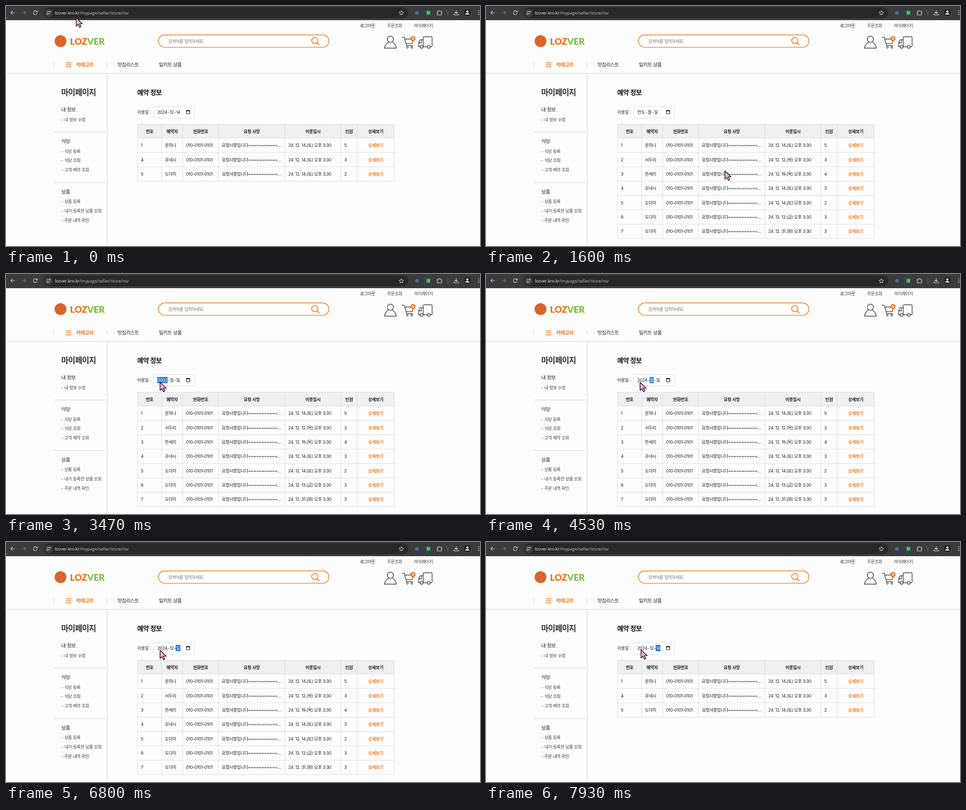
An HTML page for the animation above (8 s loop, 1000x508 px).

```html
<!DOCTYPE html>
<html lang="ko">
<head>
<meta charset="utf-8">
<title>예약 정보</title>
<style>
html, body { margin: 0; width: 100%; height: 100%; overflow: hidden; background: #fefdfe; }
#stage { position: absolute; left: 0; top: 0; width: 1000px; height: 508px; overflow: hidden; }
svg { position: absolute; left: 0; top: 0; }
text, #date { font-family: Inter, "Noto Sans CJK KR", "Noto Sans CJK", sans-serif; letter-spacing: -.045em; word-spacing: .02em; white-space: pre; }
#date { position: absolute; left: 318.6px; top: 218px; display: flex; font-size: 9.1px; line-height: 13px; color: #222; }
#date span { height: 13px; }
#date .field { padding: 0 .65px; }
#date .hint { letter-spacing: 0; }
#date .on { background: #2878d0; color: #fff; }
.link { stroke: #ee7416; stroke-width: .25px; }
</style>
</head>
<body>
<div id="stage">
  <svg id="page" width="1000" height="508" viewBox="0 0 1000 508" fill="none"></svg>
  <div id="date"></div>
  <svg width="1000" height="508" viewBox="0 0 1000 508">
    <path id="cursor" d="M0 0V17.5L4.2 13.8 7.2 20.2 10.2 18.8 7.3 12.7H13Z" fill="#f9a8e0" stroke="#111" stroke-width="1.3" stroke-linejoin="round"/>
  </svg>
</div>
<script>
const LOOP = 8000, ORANGE = '#ee7416', INK = '#222', GREY = '#444', RULE = '#dcdbe0';
const page = document.getElementById('page');
const dateBox = document.getElementById('date');
const cursor = document.getElementById('cursor');

const text = (x, y, s, o = {}) =>
  `<text x="${x}" y="${y}" font-size="${o.size || 9.1}" fill="${o.fill || INK}" font-weight="${o.weight || 400}"` +
  ` text-anchor="${o.anchor || 'start'}" class="${o.cls || ''}" style="${o.style || ''}">${s}</text>`;
const rect = (x, y, w, h, fill, more = '') =>
  `<rect x="${x}" y="${y}" width="${w}" height="${h}" fill="${fill}" ${more}/>`;
const circle = (x, y, r, fill, more = '') => `<circle cx="${x}" cy="${y}" r="${r}" fill="${fill}" ${more}/>`;
const path = (d, stroke, width = 1, more = '') =>
  `<path d="${d}" stroke="${stroke}" stroke-width="${width}" ${more}/>`;
const round = 'stroke-linecap="round" stroke-linejoin="round"';

function browserBar() {
  const light = '#d4d4d6';
  const url = "font-family:'Open Sans',sans-serif;letter-spacing:0";
  const star = Array.from({ length: 10 }, (_, i) => {
    const a = -Math.PI / 2 + i * Math.PI / 5, r = i % 2 ? 2.3 : 5;
    return (834 + r * Math.cos(a)).toFixed(1) + ' ' + (14.8 + r * Math.sin(a)).toFixed(1);
  }).join('L');
  return rect(0, 0, 1000, 30, '#3b3b3c') +
    rect(79, 3, 770, 23, '#282829', 'rx="11.5"') +
    path('M18.5 14H10.5M14 10.2 10.2 14 14 17.8', light, 1.2) +
    path('M34 14H42M38.3 10.2 42.1 14 38.3 17.8', '#77777a', 1.2) +
    '<g id="hover">' + circle(62, 14.5, 11.2, '#505052') + '</g>' +
    path('M65 11.6A4 4 0 1 0 65.8 15.2M66 9.8V12.6H63.2', light, 1.2) +
    circle(90, 14.3, 9, '#3d3d3f') +
    path('M86 12H90M93 16.7H89', light, 1.1) +
    circle(92.3, 12, 1.5, 'none', `stroke="${light}"`) + circle(87.5, 16.7, 1.5, 'none', `stroke="${light}"`) +
    text(103.3, 17.8, 'lozver.kro.kr<tspan fill="#c2c2c5">/mypage/seller/store/rsv</tspan>', { size: 9, fill: '#f1f1f2', style: url }) +
    path('M' + star + 'Z', light, 1, 'stroke-linejoin="round"') +
    circle(867, 14.3, 4, '#46659f') +
    rect(887, 10.3, 8, 8, '#41b883') +
    path('M910 11H912.7A1.6 1.6 0 0 1 915.8 11H918.5V13.8A1.6 1.6 0 0 1 918.5 16.6V19H910V16.4A1.6 1.6 0 0 0 910 13.6Z', light, 1.2, 'stroke-linejoin="round"') +
    path('M932 9.5V19.5', '#68686b') +
    path('M949.8 9V16M946.7 13 949.8 16.1 952.9 13M945.2 16V19H954.4V16', light, 1.2) +
    circle(973.3, 14, 7, '#1d1d1f') + circle(973.3, 11.8, 2.3, '#f4f4f5') +
    '<path d="M968.9 18Q969.2 14.9 973.3 14.9Q977.4 14.9 977.7 18Z" fill="#f4f4f5"/>' +
    [10.3, 14.2, 18.1].map(y => circle(997.3, y, 1, light)).join('');
}

function siteHeader() {
  const logo = 'font-family:Lato,sans-serif;letter-spacing:0';
  return text(747, 45, '로그아웃') +
    text(804, 45, '주문조회', { fill: GREY }) + text(861, 45, '마이페이지', { fill: GREY }) +
    circle(115, 74.3, 12.5, '#d9652b') +
    text(135, 81.6, 'LOZ<tspan fill="#7cbf45">VER</tspan>', { size: 19, weight: 900, fill: ORANGE, style: logo }) +
    rect(321.7, 61.2, 359.6, 26.2, '#fff', `rx="13.1" stroke="${ORANGE}" stroke-width="1.4"`) +
    text(342, 77.5, '검색어를 입력하세요.', { fill: '#757575' }) +
    circle(651.4, 73, 6.5, 'none', `stroke="${ORANGE}" stroke-width="1.5"`) +
    path('M656 77.8 660.6 82.2', ORANGE, 1.7, round) +
    // account, cart, delivery
    circle(811, 70.3, 6.5, 'none', `stroke="${GREY}" stroke-width="1.4"`) +
    path('M798.8 89.2C799 82.5 803 79.2 807 76M815 76C819 79.2 823 82.5 823.2 89.2H798.8', GREY, 1.4, round) +
    path('M835.8 66.2H840.2L845.3 84H858.2M841.2 70H860.2L857.3 79.6H844', GREY, 1.4, round) +
    circle(846.7, 87.6, 1.8, 'none', `stroke="${GREY}" stroke-width="1.2"`) +
    circle(856, 87.6, 1.8, 'none', `stroke="${GREY}" stroke-width="1.2"`) +
    circle(858.6, 69, 5.4, ORANGE) +
    text(858.5, 71.9, '0', { size: 8, weight: 700, fill: '#fff', anchor: 'middle' }) +
    path('M874 86.2H870.7V78L873.4 71.5H880M880.2 86.2V67.2Q880.2 65.2 882.2 65.2H897Q899 65.2 899 67.2V84.2Q899 86.2 897 86.2H895.2M880.2 86.2H888.6M871 78H876.5V73.5', GREY, 1.4, round) +
    circle(877, 86.4, 3, 'none', `stroke="${GREY}" stroke-width="1.4"`) +
    circle(892, 86.4, 3, 'none', `stroke="${GREY}" stroke-width="1.4"`) +
    path('M100.5 119V129.5M213.5 119V129.5', '#d2d1d5') +
    path('M126 120.4H138M126 124.6H138M126 128.8H138', ORANGE, 1.5) +
    text(148, 128.2, '카테고리', { size: 10.4, weight: 600, fill: ORANGE }) +
    text(235, 128.2, '맛집리스트', { size: 10.4 }) + text(322.5, 128.2, '밀키트 상품', { size: 10.4 }) +
    path('M0 142.5H1000M213.5 142.5V508M100 267H213.5M100 373.5H213.5', '#d4d3d7');
}

function sideMenu() {
  const groups = [
    [223, '내 정보', ['내 정보 수정']],
    [290, '식당', ['식당 등록', '식당 조회', '고객 예약 조회']],
    [396.8, '상품', ['상품 등록', '내가 등록한 상품 조회', '주문 내역 확인']]
  ];
  return text(116.5, 189.4, '마이페이지', { size: 16.7, weight: 600, fill: '#333' }) +
    groups.map(([y, title, items]) => text(116.5, y, title, { size: 10.6, weight: 500 }) +
      items.map((s, i) => text(116.8, y + 20.5 + i * 19.8, '- ' + s, { fill: GREY })).join('')).join('');
}

const edges = [277.5, 328.2, 372.8, 448.2, 588.5, 706.5, 741, 819];
const heads = ['번호', '예약자', '전화번호', '요청 사항', '이용일시', '인원', '상세보기'];
const bookings = [
  [1, '문하나', '14.(토)', 5], [2, '서두리', '12.(목)', 3], [3, '한세리', '19.(목)', 4],
  [4, '유네시', '14.(토)', 3], [5, '도다미', '14.(토)', 2], [6, '도다미', '13.(금)', 3], [7, '도다미', '31.(화)', 3]
];
const TOP = 250.3, HEAD = 29.3, ROW = 30.38;
const middle = i => (edges[i] + edges[i + 1]) / 2;

function table(id, rows) {
  const first = TOP + HEAD, end = first + rows.length * ROW;
  const body = rows.map(([no, name, day, count], r) => {
    const y = first + r * ROW + 18.6;
    const cells = [no, name, '010-0101-0101', '요청사항입니다' + '~'.repeat(11) + '…', `24. 12. ${day} 오후 3:30`, count];
    return path(`M277.5 ${first + r * ROW}H819`, RULE) +
      cells.map((s, i) => text(edges[i] + 7, y, s)).join('') +
      text(middle(6), y, '상세보기', { weight: 500, fill: ORANGE, anchor: 'middle', cls: 'link' });
  }).join('');
  return `<g id="${id}">` + rect(277.5, TOP, 541.5, HEAD, '#f0eff2') +
    heads.map((s, i) => text(middle(i), 268.5, s, { weight: 600, anchor: 'middle' })).join('') + body +
    path(edges.map(x => `M${x} ${TOP}V${end}`).join('') + `M277.5 ${TOP}H819M277.5 ${end}H819`, RULE) + '</g>';
}

page.innerHTML = browserBar() + siteHeader() + sideMenu() +
  text(277, 187.6, '예약 정보', { size: 13.8, weight: 600, fill: '#111' }) +
  text(277, 227.8, '이용일 :') +
  rect(311.5, 212.3, 86, 24.8, '#fff', `rx="2.5" stroke="${RULE}"`) +
  rect(380.7, 221.2, 7, 7, 'none', 'stroke="#111" stroke-width="1.1" rx=".6"') +
  path('M380.2 221.7H388.2', '#111', 1.8) + path('M382.2 219.8V221.5M386.2 219.8V221.5', '#111', 1.1) +
  table('all', bookings) + table('some', bookings.filter(b => b[2].startsWith('14')));

const [all, some, hover] = ['all', 'some', 'hover'].map(id => document.getElementById(id));
const RELOAD = 950, FILTER = 6900;

// time, year, month, day, selected field
const entries = [
  [0, '2024', '12', '14', -1],
  [RELOAD, '연도', '월', '일', -1],
  [2750, '연도', '월', '일', 0],
  [3400, '0002', '월', '일', 0],
  [3630, '0020', '월', '일', 0],
  [3860, '0202', '월', '일', 0],
  [4090, '2024', '월', '일', 0],
  [4450, '2024', '월', '일', 1],
  [4850, '2024', '01', '일', 1],
  [5100, '2024', '12', '일', 2],
  [6850, '2024', '12', '01', 2],
  [FILTER, '2024', '12', '14', 2]
];
// time, x, y of the pointer tip
const moves = [
  [0, 148, 25], [70, 146, 25], [480, 62, 13], [1020, 62, 13], [1500, 504, 349], [1750, 504, 349],
  [2500, 325, 229], [7840, 325, 229], [7920, 327, 228], [LOOP, 327, 228]
];

function pointer(t) {
  const i = Math.max(1, moves.findIndex(m => m[0] > t));
  const [t0, x0, y0] = moves[i - 1], [t1, x1, y1] = moves[i];
  const p = (t - t0) / (t1 - t0), e = p * p * (3 - 2 * p);
  return [x0 + (x1 - x0) * e, y0 + (y1 - y0) * e];
}

let shown = null;
function showDate(entry) {
  if (entry === shown) return;
  shown = entry;
  const on = entry[4];
  dateBox.innerHTML = entry.slice(1, 4).map((s, i) =>
    `<span class="field${/\d/.test(s) ? '' : ' hint'}${i === on ? ' on' : ''}">${s}</span>`).join('<span>-</span>');
}

function draw() {
  const t = performance.now() % LOOP;
  const [x, y] = pointer(t);
  const filtered = t < RELOAD || t >= FILTER;
  cursor.setAttribute('transform', `translate(${x.toFixed(2)} ${y.toFixed(2)})`);
  hover.style.display = Math.hypot(x - 62, y - 14.5) < 11 ? '' : 'none';
  some.style.display = filtered ? '' : 'none';
  all.style.display = filtered ? 'none' : '';
  showDate(entries.filter(e => e[0] <= t).pop());
  requestAnimationFrame(draw);
}
draw();
</script>
</body>
</html>
```
